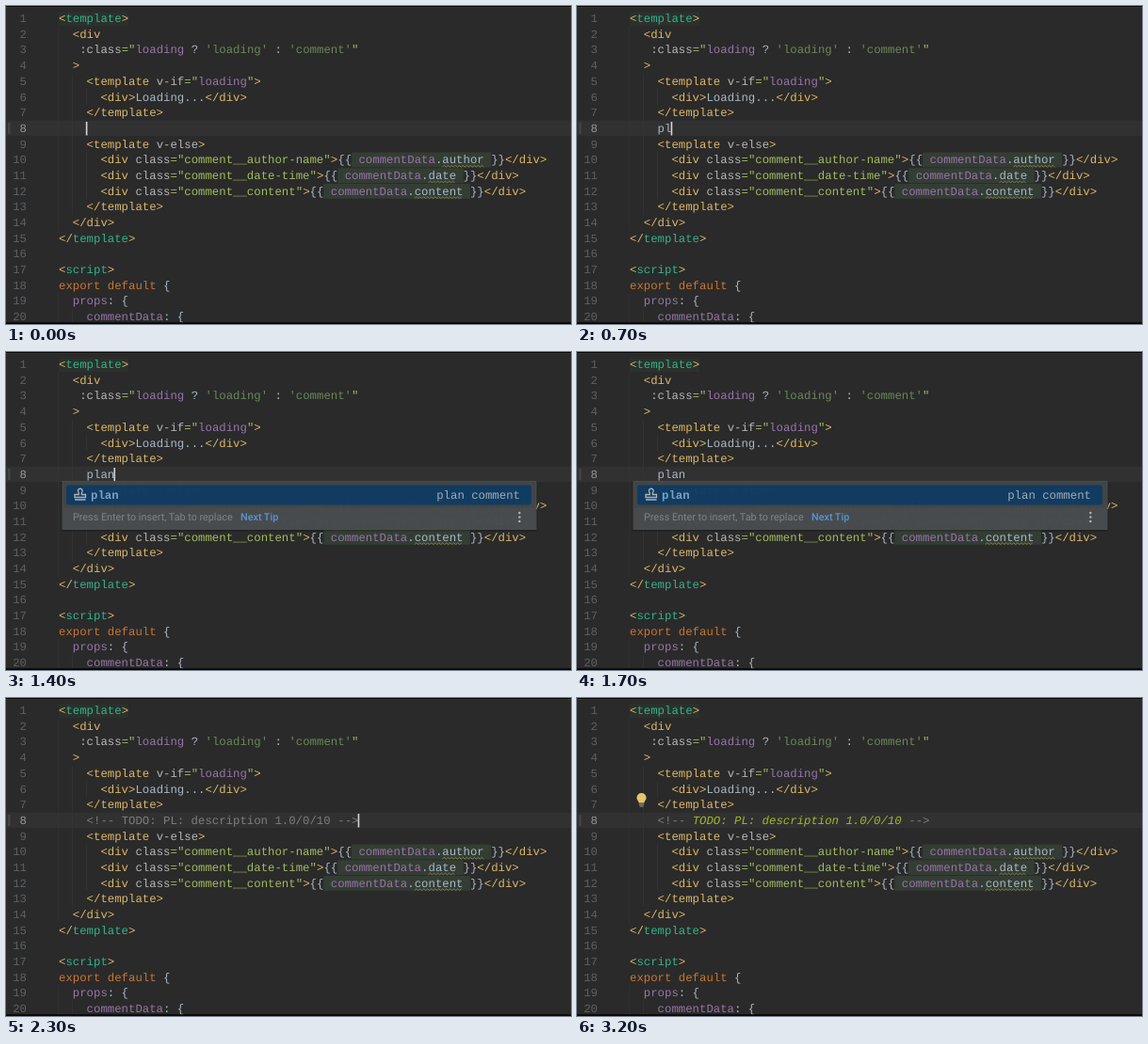
Write an HTML page that moves like this. It is 600 by 338 pixels and loops after 3.3 s.

```html
<!DOCTYPE html>
<html lang="en">
<head>
<meta charset="utf-8">
<title>Code completion</title>
<style>
html, body { margin: 0; width: 100%; height: 100%; overflow: hidden; background: #2a2a2a; }
svg { display: block; width: 100vw; height: 100vh; }
text { white-space: pre; text-rendering: geometricPrecision; }
.code text { font: 12.34px "Liberation Mono", monospace; }
.hint text { font: 10.8px Roboto, "Liberation Sans", sans-serif; }
.hint .link { font-weight: 500; }
</style>
</head>
<body>
<svg viewBox="0 0 600 338">
  <rect width="600" height="338" fill="#2a2a2a"/>
  <rect y="121.6" width="600" height="16.6" fill="#313131"/>
  <rect x="2" y="124" width="2.5" height="12" fill="#424445"/>
  <g id="guides" stroke="#363636" stroke-width=".8"></g>
  <g id="page" class="code"></g>
  <g class="code">
    <text id="typed" y="133.9" fill="#a9b7c6"></text>
    <g id="grey"></g>
    <g id="todo"></g>
  </g>
  <rect id="caret" y="123" width="1.6" height="14.5" fill="#d4d4d4"/>
  <g id="bulb">
    <path d="M65.7 111.5C65.6 109.6 63.4 108.7 63.4 106a5.1 5.1 0 0 1 10.2 0C73.6 108.7 71.4 109.6 71.3 111.5Z" fill="#e3c56b"/>
    <path d="M65.8 113h5.4M66.5 115h4" stroke="#aaa68f" stroke-width="1.2"/>
  </g>
  <g id="popup">
    <rect x="58.5" y="137" width="506" height="54" rx="2" fill="#000" opacity=".15"/>
    <rect x="60" y="137.5" width="503" height="51" fill="#434648" stroke="#505356" stroke-width=".8"/>
    <rect x="60.4" y="165.5" width="502.2" height="22.6" fill="#494c4e"/>
    <g transform="translate(0 -1)">
      <rect id="row" x="64" y="142.5" width="494" height="21" rx="3" fill="#113c62"/>
      <path d="M77.3 152.5V150.5a2.4 2.4 0 1 1 3 0V152.5H84.5V155.5H73V152.5ZM73 158h11.5" fill="none" stroke="#b0b5ba" stroke-width="1.3"/>
      <g class="code">
        <text id="item" x="90" y="156.8">plan</text>
        <text id="kind" x="457.2" y="156.8">plan comment</text>
      </g>
    </g>
    <g class="hint">
      <text x="71" y="179" fill="#82868a">Press Enter to insert, Tab to replace</text>
      <text class="link" x="249" y="179" fill="#5a97d8">Next Tip</text>
    </g>
    <g fill="#b4b8bb">
      <circle cx="545.3" cy="171" r="1.2"/><circle cx="545.3" cy="175.5" r="1.2"/><circle cx="545.3" cy="180" r="1.2"/>
    </g>
  </g>
  <path d="M0 0H600V1H0ZM0 336.3H600V338H0Z" fill="#060606"/>
  <rect y="1" width="600" height="1" fill="#343434"/>
</svg>
<script>
const LOOP = 3300, LEFT = 56, CHAR = 7.406, ROW = 16.68;
const $ = id => document.getElementById(id);
const colX = col => LEFT + col * CHAR;
const baseY = line => 17.1 + (line - 1) * ROW;

function add(parent, tag, attrs, text = '') {
  const el = document.createElementNS('http://www.w3.org/2000/svg', tag);
  for (const k in attrs) el.setAttribute(k, attrs[k]);
  el.textContent = text;
  parent.append(el);
  return el;
}

// The first letter of each part picks its colour.
const COLORS = {
  Y: '#dcb767', A: '#b6b6b6', S: '#a0bb60', Q: '#6a8759', P: '#9674a8',
  G: '#32b28b', O: '#c67632', W: '#a9b7c6', U: '#a9b7c6'
};
const field = (cls, name) =>
  `Y<div |Aclass|S="comment__${cls}"|Y>|W{{ |PcommentData|W.|U${name}|W }}|Y</div>`;
const LINES = [
  [0, 'Y<|Gtemplate|Y>'],
  [2, 'Y<div'],
  [3, "A:class|S=\"|Ploading|W ? |Q'loading'|W : |Q'comment'|S\""],
  [2, 'Y>'],
  [4, 'Y<template |Av-if|S="|Ploading|S"|Y>'],
  [6, 'Y<div>|WLoading...|Y</div>'],
  [4, 'Y</template>'],
  [0, ''],
  [4, 'Y<template |Av-else|Y>'],
  [6, field('author-name', 'author')],
  [6, field('date-time', 'date')],
  [6, field('content', 'content')],
  [4, 'Y</template>'],
  [2, 'Y</div>'],
  [0, 'Y</|Gtemplate|Y>'],
  [0, ''],
  [0, 'Y<|Gscript|Y>'],
  [0, 'Oexport default |W{'],
  [2, 'Pprops|W: {'],
  [4, 'PcommentData|W: {']
];

function wave(x, y, width) {
  let d = `M${x} ${y}`;
  for (let i = 2; i <= width; i += 2) d += `L${x + i} ${y + (i % 4 ? -1.8 : 0)}`;
  add($('page'), 'path', { d, fill: 'none', stroke: '#8a8b45', 'stroke-width': 0.9 });
}

function drawLine([col, source], index) {
  const line = index + 1, y = baseY(line), page = $('page');
  add(page, 'text', {
    x: 22 - String(line).length * CHAR, y, fill: line === 8 ? '#96989a' : '#5d6063'
  }, line);
  if (!source) return;
  const parts = source.split('|');
  const name = parts.find(p => p[0] === 'U');
  if (name) {
    const start = col + parts.slice(0, 4).join('').length - 4 + 2;
    add(page, 'rect', {
      x: colX(start), y: y - 11.6, width: (13 + name.length) * CHAR, height: 15.8, fill: '#343d34'
    });
  }
  if (line === 1) {
    add(page, 'rect', { x: LEFT, y: y - 11, width: 10 * CHAR, height: 15, fill: '#2b312c' });
  }
  for (const part of parts) {
    const text = part.slice(1), x = colX(col);
    add(page, 'text', { x, y, fill: COLORS[part[0]] }, text);
    if (part[0] === 'U') wave(x, y + 4, text.length * CHAR);
    col += text.length;
  }
}
LINES.forEach(drawLine);

// Indent guides: column, first line, last line
[[0, 2, 14], [2, 5, 13], [4, 6, 6], [4, 10, 12], [0, 19, 20], [2, 20, 20]].forEach(([col, a, b]) =>
  add($('guides'), 'path', { d: `M${colX(col) - 0.2} ${baseY(a) - 12.1}V${baseY(b) + 4.6}` }));

const TODO = 'TODO: PL: description 1.0/0/10';
const y8 = baseY(8), GREY = '#7d7d7d';
const marks = [[4, '<!--'], [40, '-->']].map(([col, text]) =>
  add($('page'), 'text', { x: colX(col), y: y8, fill: GREY }, text));
add($('grey'), 'text', { x: colX(9), y: y8, fill: GREY }, TODO);
add($('todo'), 'text', { x: colX(9), y: y8, fill: '#a3b928', style: 'font-style: italic' }, TODO);
$('typed').setAttribute('x', colX(4));

const KEYS = [[0, ''], [500, 'p'], [600, 'pl'], [800, 'pla'], [1100, 'plan']];
const SELECT = 1400, INSERT = 2000;
const ramp = (t, a, b) => Math.min(1, Math.max(0, (t - a) / (b - a)));
const show = (el, amount) => el.setAttribute('opacity', +amount);

function draw(t) {
  const inserted = t >= INSERT, selected = t >= SELECT;
  const word = KEYS.filter(k => k[0] <= t).pop()[1];
  $('typed').textContent = inserted ? '' : word;
  marks.forEach(m => show(m, inserted));

  const green = ramp(t, 2450, 2650);
  show($('grey'), inserted ? 1 - green : 0);
  show($('todo'), green);

  $('caret').setAttribute('x', colX(inserted ? 43 : 4 + word.length) - 0.8);
  show($('caret'), !(t >= 1600 && t < INSERT) && t < 2700);
  show($('bulb'), t >= 2900);

  const open = ramp(t, 760, 900), close = ramp(t, INSERT, 2250);
  const scale = (0.96 + 0.04 * open) * (1 - 0.1 * close);
  show($('popup'), 0.98 * open * (1 - close) ** 0.25);
  $('popup').setAttribute('transform',
    `translate(311.5 162.5) scale(${scale}) translate(-311.5 -162.5)`);
  show($('row'), selected);
  $('item').setAttribute('fill', inserted ? '#a3b6c9' : selected ? '#7ea3cb' : '#5c94d6');
  $('item').style.fontWeight = inserted ? 'normal' : 'bold';
  $('kind').setAttribute('fill', selected ? '#a3afba' : '#9b9ea0');
}

const start = performance.now();
function tick() {
  draw((performance.now() - start) % LOOP);
  requestAnimationFrame(tick);
}
tick();
</script>
</body>
</html>
```
